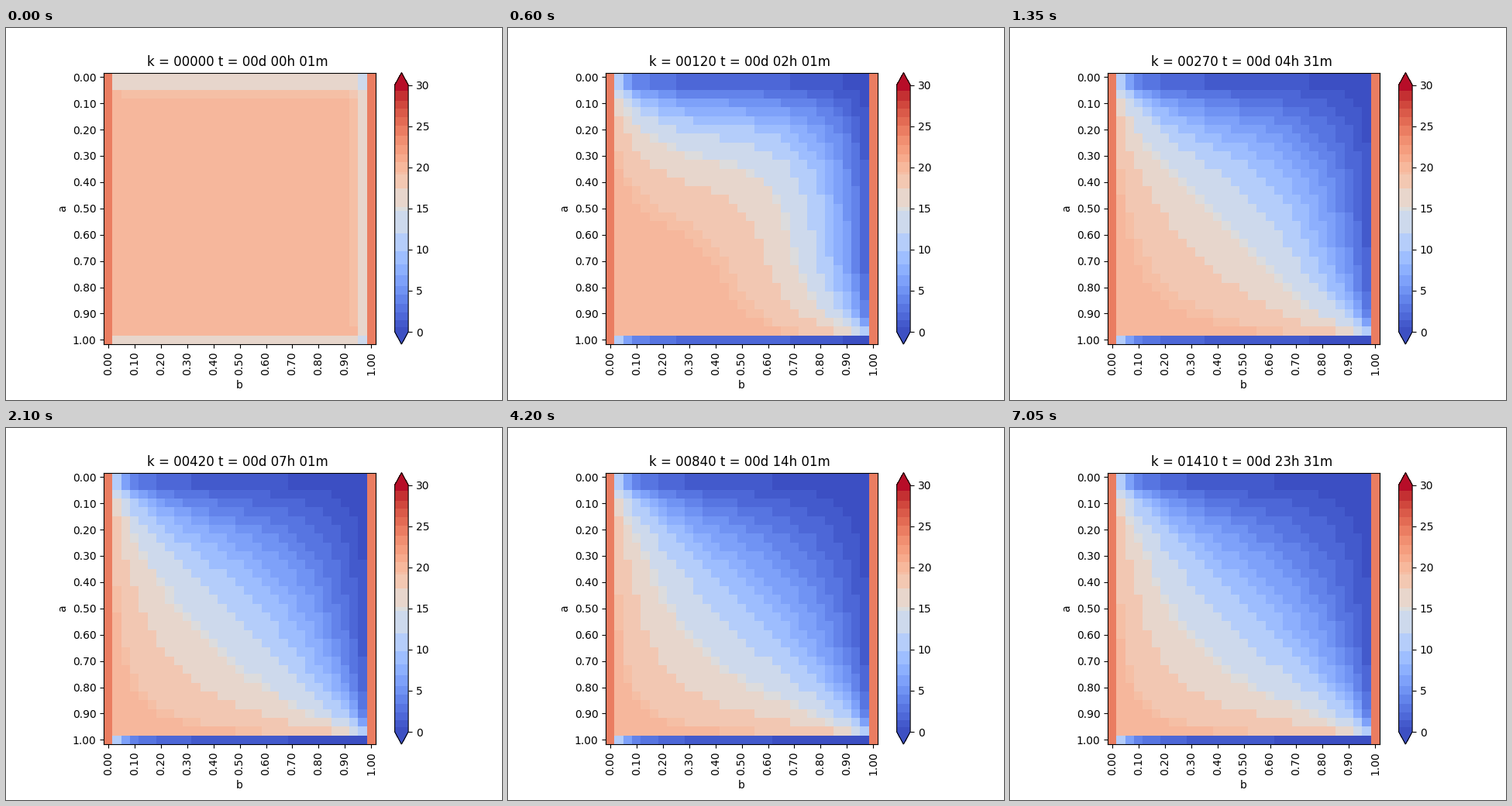
A matplotlib script for the animation above (7200 ms loop, 640 by 480 pixels).

```python
import numpy as np
import matplotlib.pyplot as plt
from matplotlib.animation import FuncAnimation
from matplotlib.colors import ListedColormap

CELLS = 30            # intervals per side, 31 grid points
FRAMES, INTERVAL = 48, 150
MINUTES = 30          # simulated minutes per frame
R = 0.28              # diffusion number of one implicit step
T_MAX, T_WARM, T_SIDE = 30, 20, 25

# Sine basis that diagonalises the Laplacian with fixed edges
idx = np.arange(1, CELLS)
basis = np.sqrt(2 / CELLS) * np.sin(np.pi * np.outer(idx, idx) / CELLS)
mu = 2 - 2 * np.cos(np.pi * idx / CELLS)
rate = mu[:, None] + mu[None, :]

# Warm left and bottom edges, cold top and right edges
source = np.zeros((CELLS - 1, CELLS - 1))
source[:, 0] += T_WARM
source[-1, :] += T_WARM
steady = basis @ source @ basis / rate
start = basis @ np.full_like(source, T_WARM) @ basis


def field(steps):
    decay = (1 + R * rate) ** -float(steps)
    inner = basis @ (steady + (start - steady) * decay) @ basis
    grid = np.full((CELLS + 1, CELLS + 1), float(T_SIDE))
    grid[1:-1, 1:-1] = inner
    grid[0, 1:-1] = grid[-1, 1:-1] = inner[0]
    return grid


def stepped_cmap():
    edges = np.array([0, 0.6, 1.45, 2.4, 3.4, 4.5, 5.6, 6.9, 8.2, 9.8, 12,
                      14.7, 15.2, 17.45, 19.15, 19.4, 20.6, 21.6, 22.7,
                      23.8, 25.1, 26.1, 27.1, 28.1, 29.3, 30])
    mids = (edges[:-1] + edges[1:]) / 2
    n = 600
    values = (np.arange(n) + 0.5) * T_MAX / n
    bins = np.searchsorted(edges, values) - 1
    return ListedColormap(plt.get_cmap("coolwarm")(mids[bins] / T_MAX))


def caption(k):
    hours, minute = divmod(k + 1, 60)
    day, hour = divmod(hours, 24)
    return f"k = {k:05d} t = {day:02d}d {hour:02d}h {minute:02d}m "


plt.rcParams["font.family"] = "DejaVu Sans"
fig, ax = plt.subplots(figsize=(6.4, 4.8), dpi=100)
fig.subplots_adjust(left=0.125, right=0.9, bottom=0.15, top=0.88)

image = ax.imshow(field(1), cmap=stepped_cmap(), vmin=0, vmax=T_MAX,
                  interpolation="nearest")
fig.colorbar(image, ax=ax, extend="both")

ticks = np.arange(0, CELLS + 1, 3)
labels = [f"{t / CELLS:.2f}" for t in ticks]
ax.set_xticks(ticks, labels, rotation=90)
ax.set_yticks(ticks, labels)
ax.set_xlabel("b")
ax.set_ylabel("a")
title = ax.set_title(caption(0))


def update(i):
    k = i * MINUTES
    image.set_data(field(k + 1))
    title.set_text(caption(k))
    return image, title


anim = FuncAnimation(fig, update, frames=FRAMES, interval=INTERVAL,
                     repeat=True, repeat_delay=0, blit=False)
plt.show()
```
